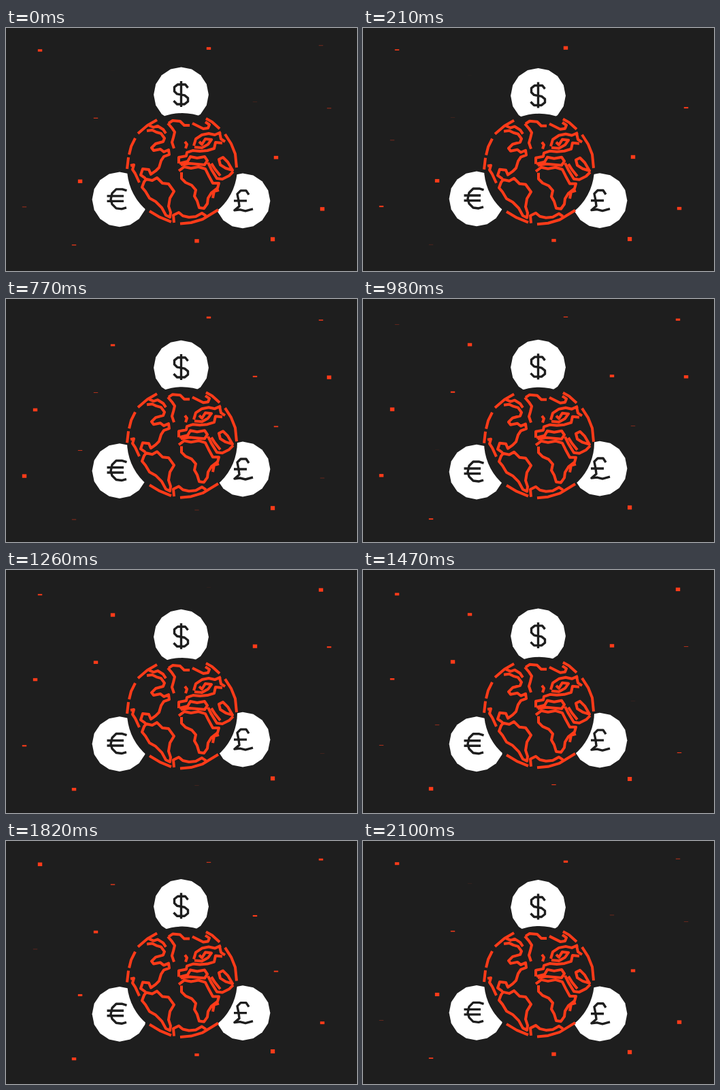
Recreate the animation shown at these times as an HTML page. Size 516 by 357 pixels, loop 2170 ms.

```html
<!DOCTYPE html>
<html lang="en">
<head>
<meta charset="utf-8">
<title>Currencies around the globe</title>
<style>
  html, body { margin: 0; width: 100%; height: 100%; overflow: hidden; background: #1e1e1e; }
  svg { display: block; width: 516px; height: 357px; }
  .coin path { fill: none; stroke: #1e1e1e; stroke-width: 3.4; stroke-linejoin: round; }
  .coin polygon { fill: #fff; }
  #globe path { fill: none; stroke: #ff3b19; stroke-width: 4; stroke-linejoin: round; }
</style>
</head>
<body>
<svg viewBox="0 0 516 357">
  <g id="sparks" fill="#ff3b19"></g>
  <g id="coins"></g>
  <g id="globe">
    <circle cx="259" cy="206" r="81" fill="#1e1e1e"/>
    <!-- broken rim -->
    <path d="M194 155L208 143L222 135M190 162L184 174L181 186M180 190L178 207
      M211 269L226 278L243 285M256 287.500L272 286L289 281L312 267
      M294 133L303 138L314 148M322 156L331 170L337 185L339 205"/>
    <!-- North America and Greenland -->
    <path d="M207 151L215 150L221 153L228 155L233 162L231 167L220 170L214 176L217 180L227 178L232 182L239 179L240 186
      L232 189L228 195L225 205L220 210L213 215L210 208L201 207L198 216L205 221
      M210 143L217 146L223 144L231 149L235 155
      M183 202L188 201L186 208L190 214L196 227
      M238 140L244 147L248 153L246 161L244 168L247 177
      M239 140L245 136L256 137L262 143L270 143
      M274 140L282 144L290 148L297 147L299 142L293 138"/>
    <!-- South America and Antarctica -->
    <path d="M206 222L215 224L222 220L230 228L239 229L247 240L241 250L239 262L242 271L241 278L235 275L229 264L220 255
      L211 250L205 240L200 234L203 226Z
      M247 286L246 275L254 271L260 276L269 278L279 277L288 272L294 276"/>
    <!-- Europe and Asia -->
    <path d="M263 167L266 171L264 177M254 199L254 190L265 188L266 183L275 180L285 181L296 180L306 177L308 168L318 169
      M255 199L267 196L271 189L281 191L292 189L296 195L292 201L281 200L270 199L257 201
      M276 173L279 163L288 157L298 155L307 157L316 153M314 154L316 163L322 167
      M277 175L288 176L297 171L302 164L293 163L288 171L284 167
      M313 193L319 190L326 197L333 209L323 206L315 201Z
      M297 198L302 208L310 221L318 222L328 217L334 211M302 199L307 207L315 217"/>
    <!-- Africa -->
    <path d="M254 210L262 204L272 206L283 204L293 207L298 217L304 228L313 228L311 235L302 242L297 250L296 258L291 265
      L284 264L281 254L277 247L279 238L273 231L264 227L258 221L258 212
      M313 238L306 240L304 250"/>
  </g>
</svg>
<script>
const LOOP = 2170, STEP = 70, TAU = Math.PI * 2;
const $ = id => document.getElementById(id);

function add(parent, tag, attrs) {
  const el = document.createElementNS("http://www.w3.org/2000/svg", tag);
  for (const k in attrs) el.setAttribute(k, attrs[k]);
  return parent.appendChild(el);
}

const wave = (t, peak) => Math.cos(TAU * (t - peak) / LOOP);

// A sixteen-sided coin; sign is drawn around the coin's centre
const outline = Array.from({ length: 16 }, (_, i) => {
  const a = TAU * i / 16;
  return [40.4 * Math.cos(a), 40.4 * Math.sin(a)].map(v => v.toFixed(2));
}).join(" ");

const coins = [
  { x: 257.5, y: 98.7, peak: 650,
    sign: "M10 -10L6 -15H-5L-10 -11V-5L-6 -1L5 1L10 5V10L5 14H-6L-11 9M0 -20V18" },
  { x: 167, y: 253.3, peak: 1420,
    sign: "M10.500 -13L4 -15L-5 -15L-11 -9L-13 0L-11 7L-5 13L3 14L10 12M-18.500 -5H6M-18.500 2.500H6" },
  { x: 348, y: 251.4, peak: 20,
    sign: "M9 -9L5 -15H-3L-8 -10L-6 0L-5 8L-12 14L-4 13L4 15L15 12M-13 0H6" }
];
for (const c of coins) {
  c.el = add($("coins"), "g", { class: "coin" });
  add(c.el, "polygon", { points: outline });
  add(c.el, "path", { d: c.sign });
}

// x, y and time at which each spark is tallest
const sparks = [
  [50, 34.3, 1800], [298, 28.8, 330], [463, 28.8, 1380], [157, 66.3, 1190],
  [366, 111.900, 1300], [475, 115.200, 740], [132, 134.800, 1500], [43, 162, 1000],
  [397, 189.500, 200], [109, 225, 60], [27, 260.200, 740], [465, 266, 2130],
  [280.500, 313, 2130], [100, 321.200, 1530]
].map(([x, y, peak]) => ({ y, peak, el: add($("sparks"), "rect", { x: x - 3.2, width: 6.4 }) }));
const ember = add($("sparks"), "rect", { x: 389, width: 6.2, height: 6 });

function draw(t) {
  for (const c of coins)
    c.el.setAttribute("transform", `translate(${c.x} ${c.y + 2.5 * wave(t, c.peak)})`);
  $("globe").setAttribute("transform", `translate(0 ${2.3 + 2.4 * wave(t, 1000)})`);

  // Sparks drift upward while opening and closing vertically
  for (const s of sparks) {
    let u = (t - s.peak) / LOOP;
    u -= Math.round(u);
    const h = 5.4 * Math.cos(Math.PI * u) ** 3;
    s.el.setAttribute("y", s.y - 8 * u - h / 2);
    s.el.setAttribute("height", h);
  }
  ember.setAttribute("y", 305.2 + 2.1 * wave(t, 50));
}

const start = performance.now();
function tick() {
  const t = (performance.now() - start) % LOOP;
  draw(Math.floor(t / STEP) * STEP);
  requestAnimationFrame(tick);
}
tick();
</script>
</body>
</html>
```
